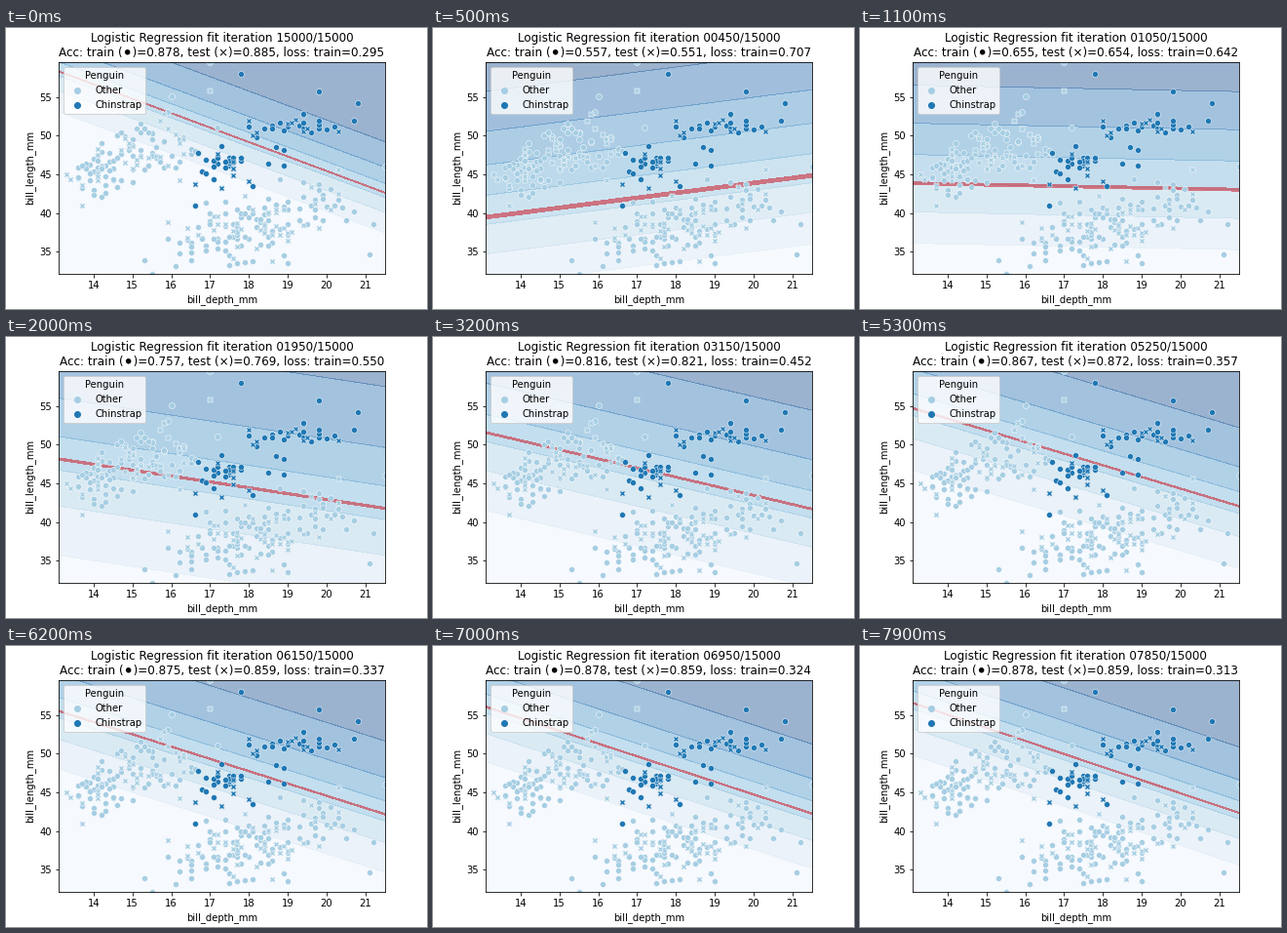
These frames come from a looping animation (432x288 px, 8 s). A matplotlib script:

```python
import matplotlib.pyplot as plt
import numpy as np
from matplotlib.animation import FuncAnimation

FRAMES, INTERVAL, LAST = 80, 100, 15000
LIGHT, DARK = "#a6cee3", "#1f78b4"
X0, X1, Y0, Y1 = 13.1, 21.5, 32.1, 59.6
rng = np.random.default_rng(7)


def cluster(n, depth, length, sd_depth, sd_length):
    x = rng.normal(depth, sd_depth, n)
    y = length + sd_length * rng.normal(0.2 * (x - depth) / sd_depth, 1)
    return np.column_stack([x, y]).round(1)


# Two clusters (females, males) per species, plus a few birds far out
others = np.vstack([
    cluster(70, 17.6, 37.3, 0.9, 1.9),
    cluster(70, 19.0, 40.4, 0.9, 2.0),
    cluster(56, 14.2, 45.6, 0.5, 1.8),
    cluster(58, 15.7, 49.3, 0.6, 1.9),
    [(17, 59.6), (17, 55.9), (16, 55.1), (16.1, 33.1), (15.5, 32.1), (21.5, 46),
     (21.1, 34.6), (21.2, 38.6), (20.3, 45.6), (19, 33.5), (13.7, 40.9)],
])
chinstraps = np.vstack([
    cluster(31, 17.6, 46.4, 0.7, 1.5),
    cluster(31, 19.1, 50.9, 0.7, 1.0),
    [(17.8, 58), (19.8, 55.8), (20.8, 54.2), (20.7, 52), (16.6, 40.9), (18.1, 43.5)],
])

fig, ax = plt.subplots(figsize=(6, 4), dpi=72)
fig.subplots_adjust(bottom=0.125)
ax.set(xlim=(X0, X1), ylim=(Y0, Y1), xlabel="bill_depth_mm", ylabel="bill_length_mm")

for name, color, pts in (("Other", LIGHT, others), ("Chinstrap", DARK, chinstraps)):
    is_test = rng.random(len(pts)) < 0.23
    for marker, part in (("o", pts[~is_test]), ("X", pts[is_test])):
        ax.scatter(*part.T, s=36, c=color, marker=marker, edgecolors="w",
                   linewidths=0.48, zorder=2)
    ax.scatter([], [], s=36, color=color, label=name)
ax.legend(title="Penguin", loc="upper left")

# Readings at a few iterations
STEPS = [50, 1050, 1950, 3150, 5250, 6950, 7850, LAST]
TRAIN = [0.494, 0.655, 0.757, 0.816, 0.867, 0.878, 0.878, 0.878]
TEST = [0.487, 0.654, 0.769, 0.821, 0.872, 0.859, 0.859, 0.885]
LOSS = [0.757, 0.642, 0.550, 0.452, 0.357, 0.324, 0.313, 0.295]
FLOOR = 0.29


def accuracy(t, readings, n):
    return round(np.interp(t, STEPS, readings) * n) / n


def loss(t):
    """Exponential decay from reading to reading."""
    return FLOOR + np.exp(np.interp(t, STEPS, np.log(np.array(LOSS) - FLOOR)))


gx, gy = np.meshgrid(np.linspace(X0, X1, 100), np.linspace(Y0, Y1, 100))
across = (gx - X0) / (X1 - X0)


def probability(t):
    """Logistic surface; the boundary runs from left to right edge (in mm)."""
    s = t / 1000
    left = 59.5 - 414.8 / (s + 4.098) ** 2
    right = 42.7 - 2.15 * np.exp(-s / 4.4) + 5.4 * np.exp(-0.92 * s ** 1.5)
    steepness = 0.064 + 0.15 * np.log(1 + s / 3)
    boundary = left + (right - left) * across
    return 1 / (1 + np.exp(steepness * (boundary - gy)))


layers = []


def update(i):
    t = 100 * i - 50 if i else LAST
    while layers:
        layers.pop().remove()
    p = probability(t)
    layers.append(ax.contourf(gx, gy, p, cmap="Blues", alpha=0.4))
    layers.append(ax.contourf(gx, gy, p, levels=[0.495, 0.505],
                              colors=["#cc2837"], alpha=0.6))
    ax.set_title(
        f"Logistic Regression fit iteration {t:05d}/{LAST}\n"
        f"Acc: train (⚫)={accuracy(t, TRAIN, 255):.3f}, "
        f"test (×)={accuracy(t, TEST, 78):.3f}, loss: train={loss(t):.3f}")


anim = FuncAnimation(fig, update, frames=FRAMES, interval=INTERVAL,
                     repeat=True, repeat_delay=0)
plt.show()
```
